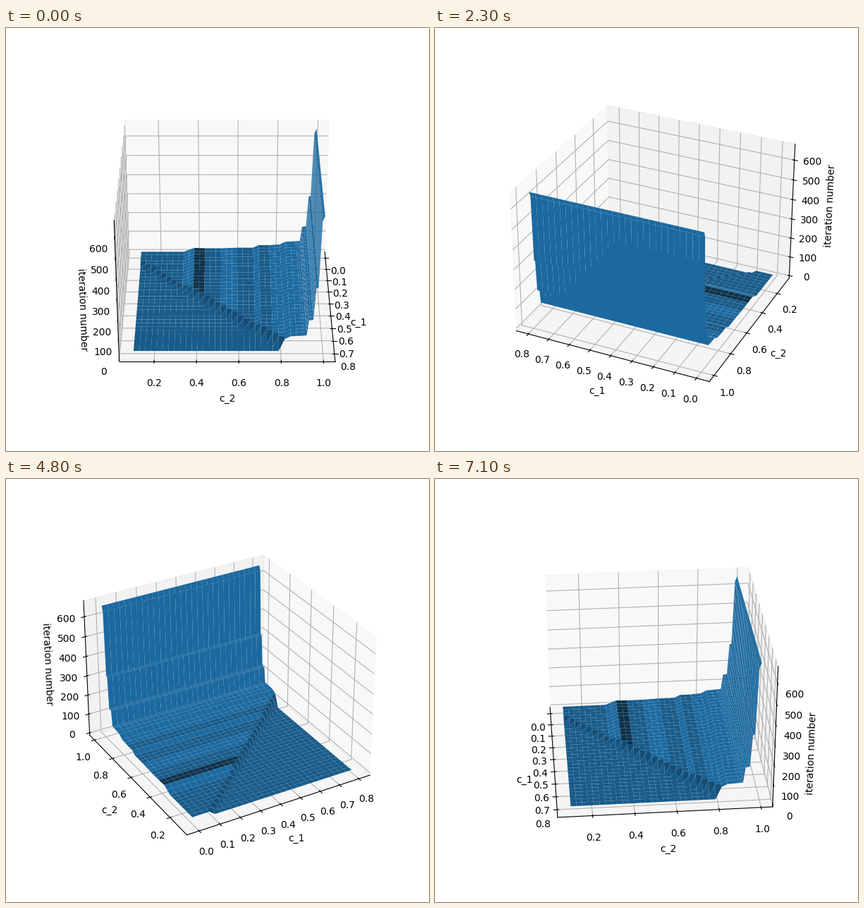
A matplotlib script for the animation above (7.2 s loop, 600x600 px).

```python
import numpy as np
import matplotlib.pyplot as plt
from matplotlib.animation import FuncAnimation

FRAMES = 72
INTERVAL = 100
STEP = 360 / FRAMES


def padded(lo, hi, margin):
    """Limits with a data margin plus the usual 3D view margin."""
    pad = (hi - lo) * margin
    lo, hi = lo - pad, hi + pad
    view = (hi - lo) / 48
    return lo - view, hi + view


# c_2 is sampled more finely close to 1
c1 = np.linspace(0, 0.8, 30)
c2 = np.append(np.linspace(0.1, 0.9, 30), np.linspace(0.91, 0.99, 9))
counts = np.array(
    [22] * 9 + [33, 43, 42] + [41] * 4 + [42, 43] + [44] * 4 + [58] * 3
    + [60, 62, 76, 78, 79, 80, 81, 157, 158, 160, 317, 320, 641, 666])

X, Y = np.meshgrid(c1, c2)
Z = np.where(X < Y, counts[:, None], 1)

fig = plt.figure(figsize=(6, 6), dpi=100)
ax = fig.add_subplot(projection="3d")
ax.plot_surface(X, Y, Z)
ax.set_xlabel("c_1")
ax.set_ylabel("c_2")
ax.set_zlabel("iteration number")
ax.set_xticks(np.linspace(0, 0.8, 9))
ax.set_yticks(np.linspace(0.2, 1, 5))
ax.set_zticks(np.arange(0, 601, 100))
ax.set_xlim(*padded(c1[0], c1[-1], 0.05))
ax.set_ylim(*padded(c2[0], c2[-1], 0.05))
ax.set_zlim(*padded(Z.min(), Z.max(), 0))


def update(i):
    azim = i * STEP
    a = np.radians(azim)
    # a tiny nudge settles which walls show in edge-on views
    ax.view_init(elev=30, azim=azim + 1e-6 * (np.cos(a) - np.sin(a)))
    return []


anim = FuncAnimation(fig, update, frames=FRAMES, interval=INTERVAL,
                     repeat=True, repeat_delay=0)
plt.show()
```
